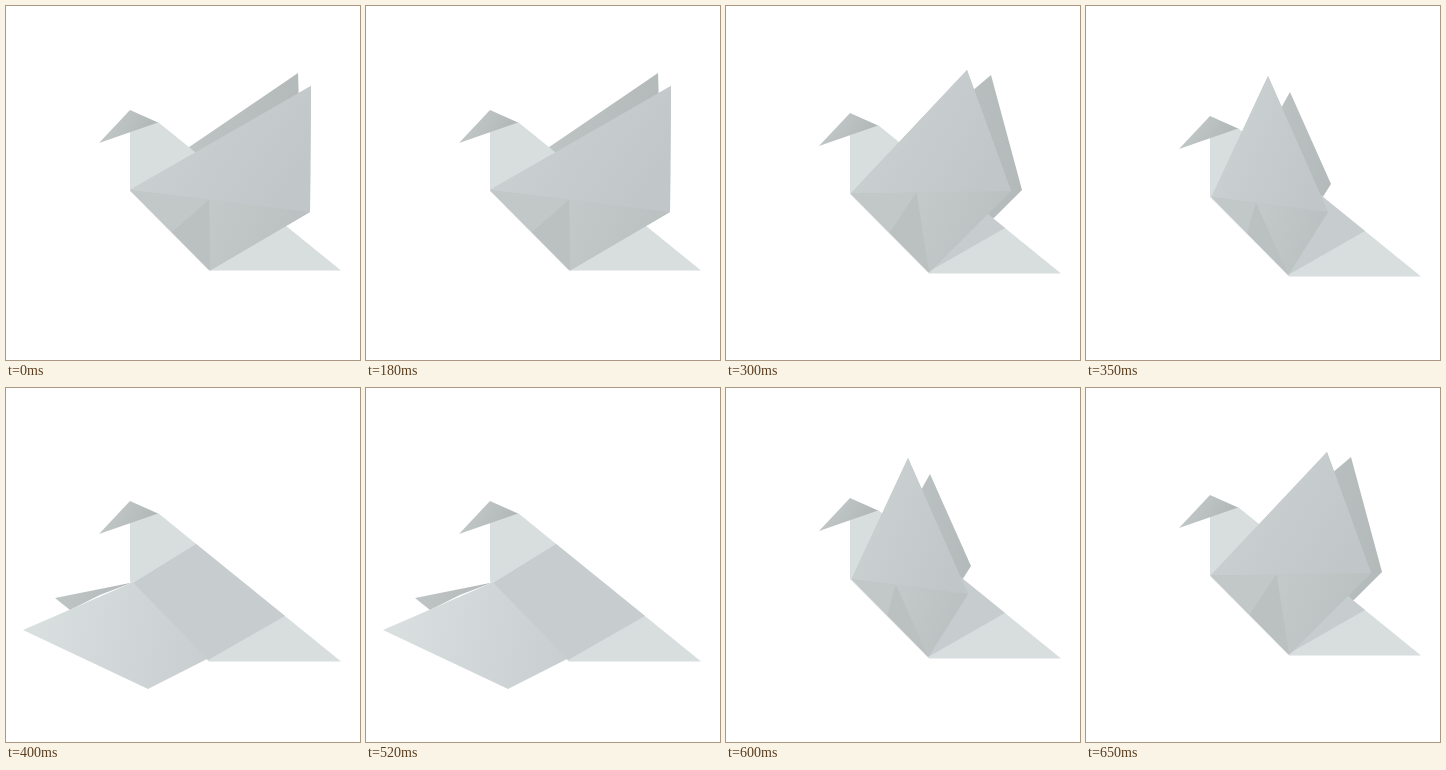
Animation, 354 px wide and 354 px high, one loop 0.7 s. Source, as an HTML page:

```html
<!DOCTYPE html>
<html lang="en">
<head>
<meta charset="utf-8">
<title>Paper bird</title>
<style>
html, body { margin: 0; width: 100%; height: 100%; overflow: hidden; background: #fff; }
svg { display: block; width: 100%; height: 100%; }
</style>
</head>
<body>
<svg viewBox="0 0 354 354">
  <defs>
    <linearGradient id="head" x1=".2" y1=".6" x2=".8" y2=".8">
      <stop stop-color="#bfc4c4"/><stop offset="1" stop-color="#b2b7b7"/>
    </linearGradient>
    <linearGradient id="wing" x1=".1" y1=".3" x2=".95" y2=".7">
      <stop stop-color="#cbd0d1"/><stop offset="1" stop-color="#c1c7c8"/>
    </linearGradient>
    <linearGradient id="flank" x1="0" y1=".2" x2="1" y2=".5">
      <stop stop-color="#c3c9c9"/><stop offset="1" stop-color="#babfc0"/>
    </linearGradient>
    <linearGradient id="open" x1="0" y1=".45" x2="1" y2=".55">
      <stop stop-color="#dae0e0"/><stop offset="1" stop-color="#c9cfd0"/>
    </linearGradient>
    <linearGradient id="back">
      <stop stop-color="#bfc5c5"/><stop offset="1" stop-color="#b4baba"/>
    </linearGradient>
  </defs>
  <g id="bird"></g>
</svg>
<script>
const bird = document.getElementById('bird');
const poly = (fill, ...points) => `<polygon points="${points}" fill="${fill}"/>`;
const mix = ([ax, ay], [bx, by], k) => [ax + (bx - ax) * k, ay + (by - ay) * k];

// Outer points of both wings, from fully raised to fully lowered
const poses = [
  { tip: [305, 80], corner: [304, 206], backTip: [292, 67], backCorner: [295, 160] },
  { tip: [241, 64], corner: [285, 185], backTip: [265, 69], backCorner: [296, 184] },
  { tip: [182, 70], corner: [242, 206], backTip: [204, 86], backCorner: [245, 178] },
  { tip: [17, 242], corner: [142, 301], backTip: [49, 210], backCorner: [64, 222] }
];
const lowest = poses.length - 1;

function raisedWing(hinge, tip, corner, base, foldAt) {
  const fold = mix(hinge, corner, foldAt);
  const edge = mix(hinge, base, foldAt + .085);
  return poly('#c0c6c7', hinge, tip, corner, base) +
    poly('url(#wing)', hinge, tip, corner) +
    poly('url(#flank)', fold, corner, base) +
    poly('#c2c7c8', hinge, fold, edge) +
    poly('#bbc0c0', edge, fold, base);
}

function drawBird(i) {
  const { tip, corner, backTip, backCorner } = poses[i];
  const sink = 3 * i;
  const at = (x, y) => [x, y + sink];
  const hinge = [124 + .8 * i, 184 + 3.5 * i];
  const base = [204 - .8 * i, 264.5 + 2.1 * i];
  const lowered = i === lowest;

  // The far wing's lower edge runs parallel to the near wing's
  const root = lowered ? hinge : [167, 152];
  const foot = [0, 1].map(n => backCorner[n] + (base[n] - corner[n]) / 2);

  return poly('url(#back)', root, backTip, backCorner, foot) +
    poly('#d8dede', at(124, 122), at(152, 116), at(335, 264.5), at(203, 264.5), at(124, 185)) +
    poly('#c7cccf', at(190, 147), at(279, 219), at(202, 263), at(127, 186)) +
    (lowered
      ? poly('url(#open)', hinge, tip, corner, base)
      : raisedWing(hinge, tip, corner, base, .44 - .03 * i)) +
    poly('url(#head)', at(93, 137), at(124, 104), at(152, 116.5));
}

let shown = -1;
function draw() {
  const step = Math.floor(performance.now() % 700 / 50);
  const pose = Math.max(0, Math.min(lowest, step - 5, 14 - step));
  if (pose !== shown) bird.innerHTML = drawBird(shown = pose);
  requestAnimationFrame(draw);
}
draw();
</script>
</body>
</html>
```
